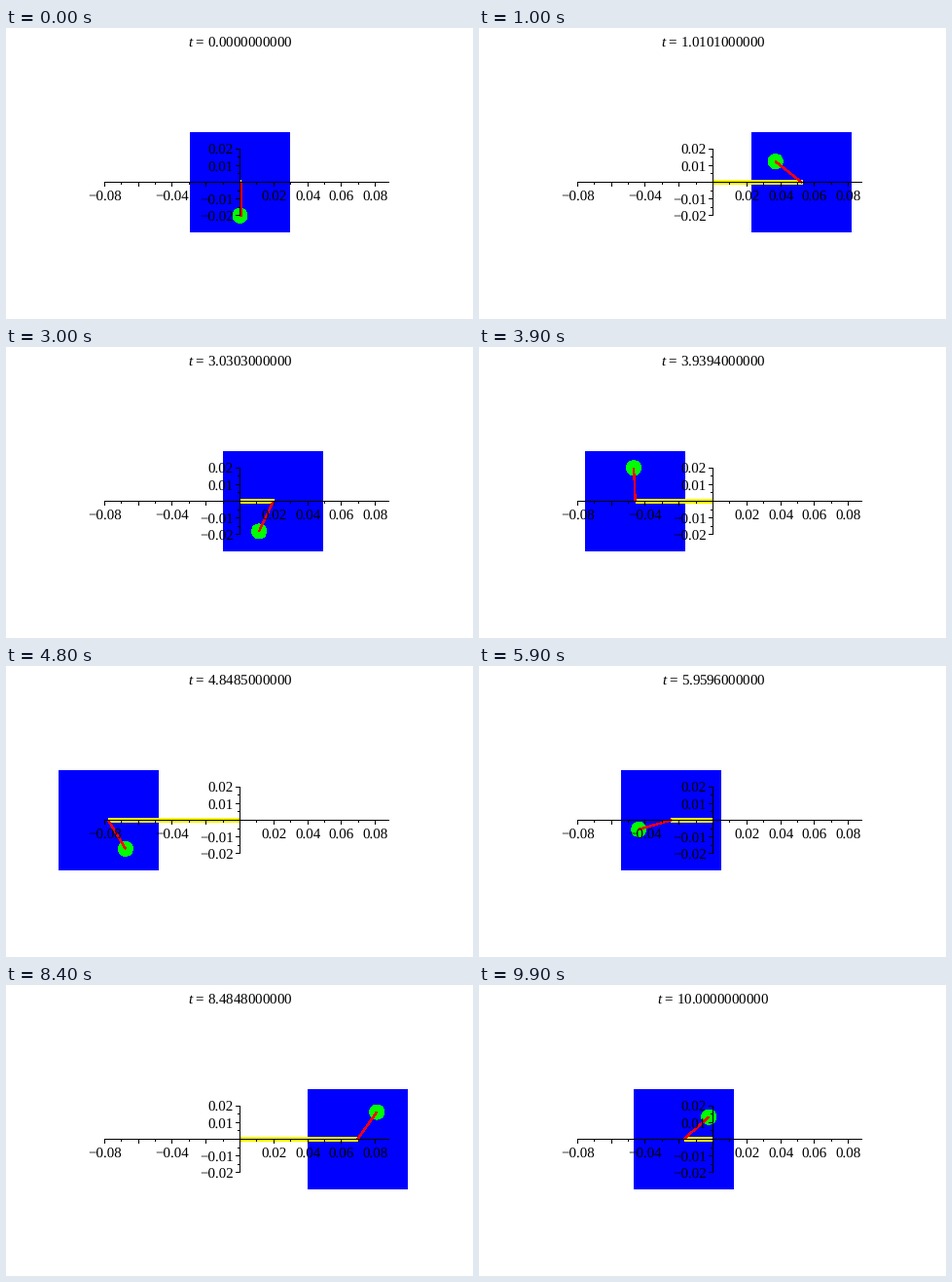
A matplotlib script that plays this animation: 480x299 px, repeating every 10000 ms.

```python
import matplotlib.pyplot as plt
import numpy as np
from matplotlib.animation import FuncAnimation
from matplotlib.patches import Circle, Rectangle

W, H, DPI = 480, 299, 100
FRAMES, INTERVAL = 100, 100
PX = 72 / DPI                 # points per pixel
CX, CY = 240.5, 158.5         # axis origin
XSTEP, YSTEP = 17.4, 17.15    # pixels per 0.01
SIDE, ARM = 103, 34.3

plt.rcParams.update({
    "font.family": "Liberation Serif",
    "font.size": 15 * PX,
    "text.hinting": "none",
    "mathtext.fontset": "custom",
    "mathtext.rm": "Liberation Serif",
    "mathtext.it": "Liberation Serif:italic",
})

fig = plt.figure(figsize=(W / DPI, H / DPI), dpi=DPI, facecolor="white")
ax = fig.add_axes([0, 0, 1, 1])
ax.set_xlim(0, W)
ax.set_ylim(H, 0)
ax.axis("off")


def segment(x0, y0, x1, y1):
    # half a pixel back, so that snapping lands on the pixel holding the point
    ax.plot([x0 - 0.5, x1 - 0.5], [y0 - 0.5, y1 - 0.5], color="black", lw=PX,
            zorder=6, antialiased=False, solid_capstyle="projecting")


def label(x, y, value, ha):
    text = f"{value:.2f}".replace("-", "\u2212")
    ax.text(x, y, text, ha=ha, va="baseline", zorder=7)


def draw_axes():
    segment(101, CY, 393, CY)
    segment(CX, CY - 2 * YSTEP, CX, CY + 2 * YSTEP)
    for k in range(-8, 9):
        x = CX + k * XSTEP
        if k:
            segment(x, CY, x, CY + (2 if k % 2 else 4))
        if k in (-8, -4, 2, 4, 6, 8):
            label(x, 177.5, k / 100, "center")
    for k in range(-4, 5):
        y = CY - k * YSTEP / 2
        if k:
            segment(CX - (2 if k % 2 else 4), y, CX, y)
            if k % 2 == 0:
                label(233.5, y + 6, k / 200, "right")


def shift(t):
    """Horizontal travel of the block: free swing plus two forced harmonics."""
    return (121.3 * np.sin(0.9765 * t)
            - 4 * np.sin(4 * t)
            - 13.6 * np.sin(8 * t))


draw_axes()
block = ax.add_patch(Rectangle((0, CY - SIDE / 2), SIDE, SIDE,
                               fc="#0000ff", ec="none", zorder=1))
spring, = ax.plot([], [], color="#ffff00", lw=5 * PX, zorder=2,
                  antialiased=False, solid_capstyle="butt")
bob = ax.add_patch(Circle((0, 0), 7.5, fc="#00ff00", ec="none", zorder=3,
                          antialiased=False))
rod, = ax.plot([], [], color="#ff0000", lw=1.3 * PX, zorder=4,
               antialiased=False, solid_capstyle="butt")
title = ax.text(241, 20, "", ha="center", va="baseline", zorder=7)


def update(i):
    t = 10 * i / (FRAMES - 1)
    x = CX + shift(t)
    bx, by = x + ARM * np.sin(4 * t), CY + ARM * np.cos(4 * t)
    block.set_x(round(x - SIDE / 2))
    spring.set_data([CX - 0.5, x], [CY - 0.5, CY - 0.5])
    rod.set_data([x, bx], [CY, by])
    bob.center = bx, by
    shown = float(f"{t:.5g}")
    title.set_text(f"$t$ = {shown:.10f}")
    return block, spring, rod, bob, title


anim = FuncAnimation(fig, update, frames=FRAMES, interval=INTERVAL,
                     repeat=True, repeat_delay=0, blit=False)
plt.show()
```
